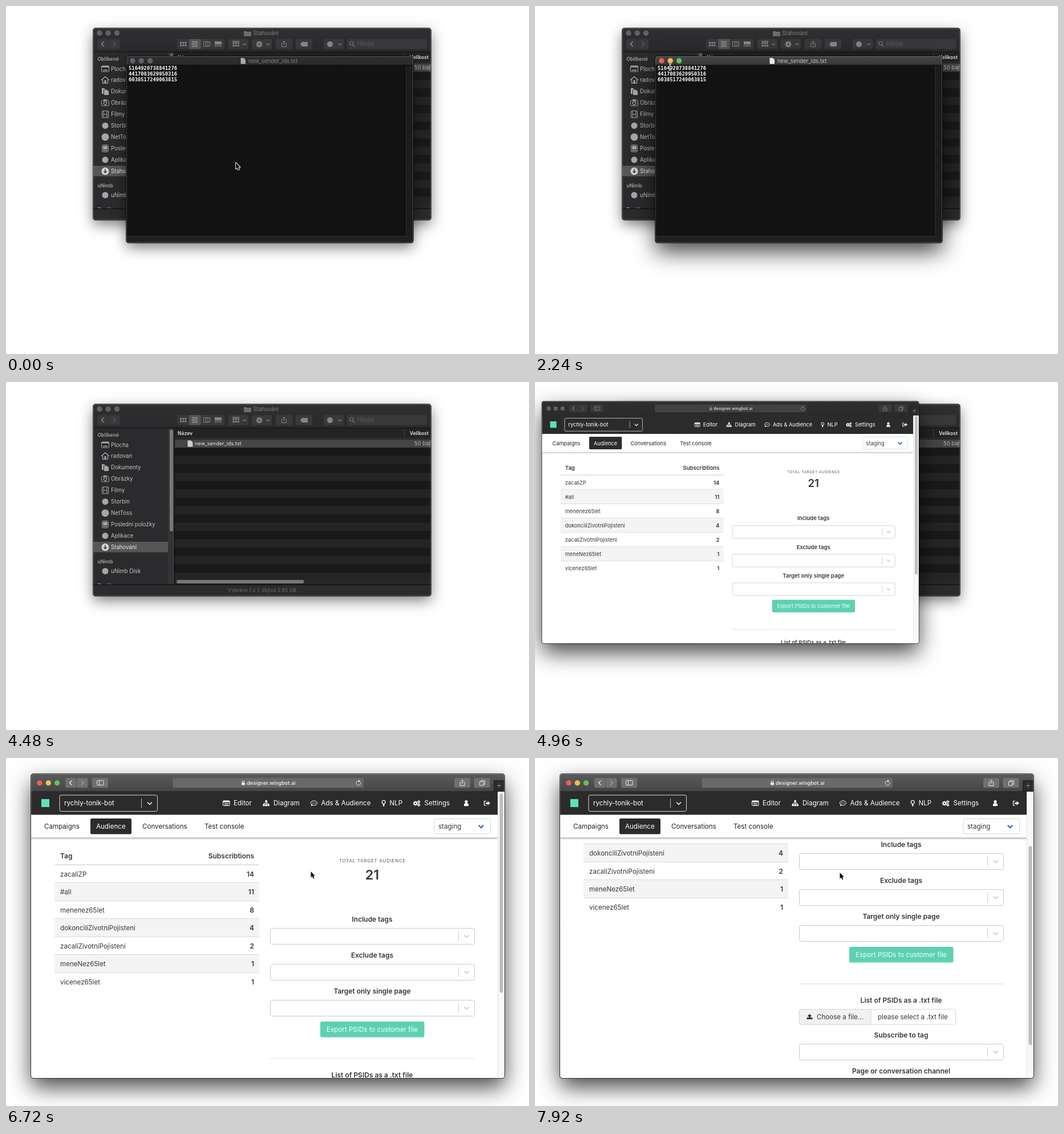
An HTML page with a canvas for the animation above (8 s loop, 917 px wide and 610 px high).

```html
<!DOCTYPE html>
<html lang="cs">
<head>
<meta charset="utf-8">
<title>Export workflow</title>
<style>
html, body { margin: 0; width: 100%; height: 100%; overflow: hidden; background: #fff; }
canvas { display: block; }
</style>
</head>
<body>
<canvas id="stage" width="917" height="610"></canvas>
<script>
const c = document.getElementById('stage').getContext('2d');
const LOOP = 8000, STEP = 80;
const SANS = 'Inter, Roboto, sans-serif', MONO = '"DejaVu Sans Mono", monospace';
const LIGHTS = ['#ee5c54', '#f5bd4f', '#5fc454'];
const DIM_BAR = ['#2f2f31', '#2a2a2c'], EDITOR_BAR = ['#454547', '#373739'], BROWSER_BAR = ['#5a5a5c', '#464648'];

// Drawing helpers
function box(x, y, w, h, fill, r = 0, stroke) {
  c.beginPath();
  c.roundRect(x, y, w, h, r);
  if (fill) { c.fillStyle = fill; c.fill(); }
  if (stroke) { c.strokeStyle = stroke; c.lineWidth = 1; c.stroke(); }
}
function dot(x, y, r, fill, stroke) {
  c.beginPath();
  c.arc(x, y, r, 0, 7);
  if (fill) { c.fillStyle = fill; c.fill(); }
  if (stroke) { c.strokeStyle = stroke; c.lineWidth = 1.2; c.stroke(); }
}
function line(color, width, ...p) {
  c.beginPath();
  for (let i = 0; i < p.length; i += 2) c.lineTo(p[i], p[i + 1]);
  c.strokeStyle = color;
  c.lineWidth = width;
  c.stroke();
}
function poly(fill, ...p) {
  c.beginPath();
  for (let i = 0; i < p.length; i += 2) c.lineTo(p[i], p[i + 1]);
  c.closePath();
  c.fillStyle = fill;
  c.fill();
}
function text(s, x, y, size, color, weight = 400, align = 'left', family = SANS) {
  c.font = `${weight} ${size}px ${family}`;
  c.textAlign = align;
  c.fillStyle = color;
  c.fillText(s, x, y);
}
function chevron(x, y, color, r = 4, w = 1.5) {
  line(color, w, x - r, y - r / 2, x, y + r / 2, x + r, y - r / 2);
}
function sideArrow(x, y, dir, color) {
  line(color, 1.3, x - 2 * dir, y - 4, x + 2 * dir, y, x - 2 * dir, y + 4);
}
function lights(x, y, active) {
  for (let i = 0; i < 3; i++) dot(x + 15.3 * i, y, 4.7, active ? LIGHTS[i] : '#626264');
}
function frame(x, y, w, h, raised, draw) {
  c.save();
  c.shadowColor = raised ? 'rgba(0,0,0,.72)' : 'rgba(0,0,0,.52)';
  c.shadowBlur = raised ? 38 : 24;
  c.shadowOffsetY = raised ? 16 : 8;
  box(x, y, w, h, '#222', 4);
  c.restore();
  c.save();
  c.beginPath();
  c.roundRect(x, y, w, h, 4);
  c.clip();
  draw();
  c.restore();
  box(x - .5, y - .5, w + 1, h + 1, null, 4.5, 'rgba(0,0,0,.7)');
  box(x + .5, y + .5, w - 1, h - 1, null, 4, 'rgba(255,255,255,.2)');
}
function bar(x, y, w, h, [top, bottom]) {
  const g = c.createLinearGradient(0, y, 0, y + h);
  g.addColorStop(0, top);
  g.addColorStop(1, bottom);
  box(x, y, w, h, g);
}
function page(x, y, w, h, color) {
  poly(color, x, y, x + w * .6, y, x + w, y + h * .3, x + w, y + h, x, y + h);
}
function shareIcon(x, y, color) {
  line(color, 1, x - 2, y - 1, x - 4, y - 1, x - 4, y + 5, x + 4, y + 5, x + 4, y - 1, x + 2, y - 1);
  line(color, 1, x, y + 2, x, y - 5);
  line(color, 1, x - 2, y - 3, x, y - 5, x + 2, y - 3);
}
function gear(x, y, r, color, hole) {
  for (let i = 0; i < 4; i++) {
    const a = i * Math.PI / 4, dx = Math.cos(a) * r, dy = Math.sin(a) * r;
    line(color, r * .4, x - dx, y - dy, x + dx, y + dy);
  }
  dot(x, y, r * .75, color);
  dot(x, y, r * .32, hole);
}

// File manager
const ICON = '#a6a6a6';
const sideItems = [
  ['Plocha', y => { box(167.5, y - 5, 13, 10, null, 1, ICON); box(168, y - 5, 12, 2.5, ICON); line(ICON, 1.5, 170, y + 2.5, 178, y + 2.5); }],
  ['radovan', y => { line(ICON, 1.4, 167, y, 174, y - 6, 181, y); line(ICON, 1.2, 169.5, y - 1, 169.5, y + 5.5, 178.5, y + 5.5, 178.5, y - 1); box(172.5, y, 3, 5, ICON); }],
  ['Dokumenty', y => { page(168, y - 6, 7, 10, ICON); page(171, y - 3.5, 10, 10, '#2b2b2d'); page(172, y - 3, 8, 9, ICON); }],
  ['Obrázky', y => { box(167.5, y - 4, 13, 9, null, 1.5, ICON); box(171, y - 6, 6, 2, ICON); dot(174, y + .5, 2.7, null, ICON); }],
  ['Filmy', y => { box(168.5, y - 6, 11, 12, null, 1, ICON); line(ICON, 1, 171, y - 6, 171, y + 6); line(ICON, 1, 177, y - 6, 177, y + 6); line(ICON, 1, 171, y, 177, y); }],
  ['Storbin', y => dot(174, y, 5.5, ICON)],
  ['NetToss', y => dot(174, y, 6.5, ICON)],
  ['Poslední položky', y => { box(168.5, y - 6, 11, 12, null, 2, ICON); box(170, y - 4.5, 8, 6, ICON); line(ICON, 1.5, 170, y + 3.5, 178, y + 3.5); }],
  ['Aplikace', y => dot(174, y, 5.5, ICON)],
  ['Stahování', y => { dot(174, y, 6.5, '#d4d4d4'); line('#444', 1.6, 174, y - 4, 174, y + 2); poly('#444', 170.5, y, 177.5, y, 174, y + 4); }]
];

function finderToolbar() {
  const fg = '#858585', bg = '#39393b';
  lights(164, 47.5, false);
  box(417, 44, 5, 3, '#6c6c6c', 1);
  box(417, 45, 13, 8, '#6c6c6c', 1);
  text('Stahování', 433, 51.4, 9.7, '#808080');
  const parts = [[160, 19], [180, 19], [300, 83], [390, 35], [431, 35], [473, 29], [508, 29], [557, 35]];
  for (const [x, w] of parts) box(x, 58, w, 17.5, bg, 2.5);
  box(321, 58, 20.5, 17.5, '#555557');
  sideArrow(169.5, 66.5, -1, '#999');
  sideArrow(189.5, 66.5, 1, '#5d5d5d');
  for (let i = 0; i < 6; i++) {
    const dx = i % 3 * 4.2, dy = i > 2 ? 4.5 : 0;
    box(305 + dx, 63 + dy, 3, 3, fg);
    box(397.5 + dx, 63.5 + dy, 3, 3, fg);
  }
  for (let i = 0; i < 4; i++) line('#aaa', 1, 326, 62.5 + 2.8 * i, 336, 62.5 + 2.8 * i);
  box(346.5, 62.5, 11, 8, null, 0, fg);
  line(fg, 1, 350.5, 62, 350.5, 71);
  line(fg, 1, 354, 62, 354, 71);
  box(366, 62, 12, 5.5, fg);
  for (let i = 0; i < 4; i++) box(366 + 3.2 * i, 69, 2.2, 2, fg);
  line(fg, 1.5, 397, 62, 409, 62);
  gear(444, 67, 5.5, fg, bg);
  shareIcon(487.5, 66.5, fg);
  poly(fg, 516, 67, 519, 63, 529, 63, 529, 71, 519, 71);
  dot(568, 67, 5, fg);
  for (const x of [418, 459.5, 585.5]) chevron(x, 67, fg, 2.4, 1.2);
  box(598, 58, 140, 17.5, '#39393b', 2.5);
  dot(606, 65.5, 3, null, '#777');
  line('#777', 1.2, 608, 68, 611, 71);
  text('Hledat', 616, 70.2, 9.7, '#59595b');
}

function finder() {
  frame(153, 39, 592, 336, false, () => {
    box(153, 39, 592, 336, '#2b2b2d');
    bar(153, 39, 592, 42, DIM_BAR);
    finderToolbar();
    line('#111', 1, 153, 80.5, 745, 80.5);
    // Sidebar
    box(153, 280, 131, 18.5, '#555756');
    text('Oblíbené', 160.5, 95.8, 8.6, '#a2a2a2', 600);
    sideItems.forEach(([name, icon], i) => {
      const y = 110 + 19.95 * i;
      icon(y);
      text(name, 184, y + 3.5, 9.7, i == 9 ? '#e6e6e6' : '#c2c2c2');
    });
    text('uNimb', 160.5, 317.6, 8.6, '#a2a2a2', 600);
    dot(174, 331.5, 5.5, ICON);
    text('uNimb Disk', 184, 335.2, 9.7, '#c2c2c2');
    text('Značky', 160.5, 359.5, 8.6, '#a2a2a2', 600);
    box(284, 81, 11, 274, '#343436');
    box(287, 83.5, 6, 178.5, '#777', 3);
    line('#0a0a0a', 1, 295.5, 81, 295.5, 355);
    // File list
    box(296, 81, 449, 274, '#191919');
    for (let i = 0; i < 17; i += 2) box(296, 100.5 + 14.6 * i, 449, 14.6, i ? '#242424' : '#454547');
    box(296, 81, 449, 17, '#232324');
    line('#3d3d3d', 1, 296, 98.5, 745, 98.5);
    line('#444', 1, 698.5, 83, 698.5, 97);
    text('Název', 301, 93.2, 8.6, '#e2e2e2', 600);
    text('Velikost', 708, 93.2, 8.6, '#e2e2e2', 600);
    page(318.5, 102.5, 9, 11, '#ccc');
    text('new_sender_ids.txt', 331, 111.2, 9, '#e8e8e8');
    text('50 bajtů', 716, 111.2, 9.5, '#b4b4b4');
    box(296, 344, 449, 11, '#272728');
    box(299, 347, 223.5, 6, '#777', 3);
    box(153, 355, 592, 20, '#2b2b2d');
    line('#0a0a0a', 1, 153, 355.5, 745, 355.5);
    text('Vybráno 1 z 1, zbývá 2,85 GB', 449, 367.6, 8.8, '#6d6d6d', 400, 'center');
  });
}

// Text editor
function editor(active) {
  frame(211, 88, 503, 327, active, () => {
    box(211, 88, 503, 327, '#121212');
    bar(211, 88, 503, 16, active ? EDITOR_BAR : DIM_BAR);
    line('#080808', 1, 211, 103.8, 714, 103.8);
    lights(222, 96, active);
    page(411.5, 91, 8.5, 10.5, active ? '#eee' : '#aaa');
    text('new_sender_ids.txt', 425, 99.6, 9.5, active ? '#c4c4c4' : '#808080');
    ['5164920738841276', '4417083629950316', '6038517249063815'].forEach((id, i) =>
      text(id, 215, 112.3 + 10 * i, 8.83, '#fff', 700, 'left', MONO));
    box(702, 104.5, 12, 311, '#1c1c1c');
    box(211, 404, 503, 11, '#202020');
    line('#303030', 1, 211, 403.5, 702, 403.5, 702, 104);
  });
}

// Browser
const tags = [['zacaliZP', 14], ['#all', 11], ['menenez65let', 8], ['dokonciliZivotniPojisteni', 4],
  ['zacaliZivotniPojisteni', 2], ['meneNez65let', 1], ['vicenez65let', 1]];
const INK = '#363636', DARK = '#2b2b2c';
const body = (s, x, y, color = INK, align) => text(s, x, y, 11.6, color, 400, align);
const strong = (s, x, y, align) => text(s, x, y, 12, INK, 600, align);

function select(y) {
  box(463.5, y + .5, 358, 28, '#fff', 3, '#c9c9c9');
  line('#ccc', 1, 793.5, y + 6, 793.5, y + 23);
  chevron(807.5, y + 14.5, '#c4c4c4');
}

function content() {
  strong('Tag', 95, 178.6);
  strong('Subscribtions', 435, 178.6, 'right');
  line('#d8d8d8', 1.6, 85, 190.2, 444, 190.2);
  tags.forEach(([name, n], i) => {
    const y = 191 + 31.45 * i;
    if (i % 2) box(85, y, 359, 31.4, '#f4f4f4');
    if (i) line('#d8d8d8', 1, 85, Math.round(y) - .5, 444, Math.round(y) - .5);
    body(name, 95, y + 19.8);
    strong(n, 435, y + 19.8, 'right');
  });
  c.letterSpacing = '.85px';
  text('TOTAL TARGET AUDIENCE', 642.5, 186.4, 7.8, '#555', 400, 'center');
  c.letterSpacing = '0px';
  text('21', 642, 216.4, 23.5, INK, 600, 'center');
  ['Include tags', 'Exclude tags', 'Target only single page'].forEach((s, i) => {
    strong(s, 642, 289.8 + 63 * i, 'center');
    select(301 + 63 * i);
  });
  box(551, 465, 182.5, 27.5, '#5dd1b1', 2.5);
  body('Export PSIDs to customer file', 642, 483, '#f4fffb', 'center');
  line('#dcdcdc', 1, 463, 530, 822, 530);
  strong('List of PSIDs as a .txt file', 642, 562.8, 'center');
  box(463.5, 574.5, 274, 26.5, '#fff', 3, '#d6d6d6');
  box(463.5, 574.5, 125.5, 26.5, '#f1f1f1', [3, 0, 0, 3], '#d6d6d6');
  poly(INK, 477.5, 587, 481.5, 582.5, 485.5, 587);
  box(480.3, 586, 2.6, 4, INK);
  box(476.5, 589, 10, 3, INK);
  body('Choose a file...', 494, 592);
  body('please select a .txt file', 601, 592);
  strong('Subscribe to tag', 642, 624, 'center');
  select(635);
  strong('Page or conversation channel', 642, 687, 'center');
}

function navIcons() {
  const w = '#fff';
  box(380.5, 75, 11.5, 8.5, null, 1, w);
  box(380.5, 75, 11.5, 2.5, w);
  for (const y of [79.5, 81.8]) line(w, 1, 382.5, y, 390, y);
  box(454.5, 74, 3.5, 3.5, w);
  for (const x of [450.5, 454.5, 458.5]) box(x, 81, 3.3, 3.3, w);
  line(w, 1, 452, 81, 452, 79.3, 460, 79.3, 460, 81);
  line(w, 1, 456.2, 77, 456.2, 81);
  c.beginPath();
  c.ellipse(540, 79, 5.5, 4, 0, 0, 7);
  c.strokeStyle = w;
  c.stroke();
  poly(w, 535.5, 81, 538.5, 82.5, 535, 84.5);
  for (const x of [537.5, 540, 542.5]) dot(x, 79, .8, w);
  dot(662.2, 77.3, 3, null, w);
  line(w, 2.4, 662.2, 80.5, 662.2, 84.5);
  gear(717.8, 79.5, 4, w, DARK);
  gear(723.7, 76.8, 2.6, w, DARK);
  gear(723.7, 82.3, 2.6, w, DARK);
  dot(807, 76.5, 2.6, w);
  box(803, 79.3, 8, 5, w, [3, 3, 1, 1]);
  line(w, 1.2, 842, 75.5, 838.5, 75.5, 838.5, 83, 842, 83);
  box(841, 78, 4, 2.6, w);
  poly(w, 844.5, 75.5, 849, 79.3, 844.5, 83);
}

function browserBar(active) {
  const btn = active ? '#707072' : '#3a3a3c', fg = active ? '#e8e8e8' : '#8a8a8a';
  bar(44, 28, 830, 30, active ? BROWSER_BAR : DIM_BAR);
  lights(59, 43.8, active);
  for (const [x, w] of [[104, 19], [124, 19.5], [151, 28], [786, 28], [820.5, 28]]) box(x, 35, w, 17, btn, 2.5);
  sideArrow(113.5, 43.5, -1, fg);
  sideArrow(134, 43.5, 1, active ? '#a2a2a2' : '#5c5c5c');
  box(159.5, 39.5, 11.5, 8, null, 1, fg);
  line(fg, 1, 163.5, 39.5, 163.5, 47.5);
  box(292.5, 35, 334.5, 17, active ? '#69696b' : '#414143', 2.5);
  box(413, 43, 6, 4.5, fg, .5);
  line(fg, 1, 414.3, 43, 414.3, 40.5, 417.7, 40.5, 417.7, 43);
  text('designer.wingbot.ai', 422, 47.2, 9.1, active ? '#f4f4f4' : '#e0e0e0', 500);
  c.beginPath();
  c.arc(618, 44, 3.8, -.4, 5.2);
  c.strokeStyle = fg;
  c.lineWidth = 1;
  c.stroke();
  poly(fg, 618, 38.2, 621.5, 40.5, 618, 42.5);
  shareIcon(800, 43.5, fg);
  box(830.5, 41.5, 6.5, 6.5, null, 0, fg);
  line(fg, 1, 833, 41.5, 833, 39.5, 839.5, 39.5, 839.5, 46, 837, 46);
  box(855.5, 39.5, 19, 19, '#2c2c2e', 0, '#1d1d1f');
  line('#888', 1, 860.5, 48.5, 868.5, 48.5);
  line('#888', 1, 864.5, 44.5, 864.5, 52.5);
}

function browser(active, scroll) {
  frame(44, 28, 830, 533, true, () => {
    box(44, 58, 830, 503, '#fff');
    c.save();
    c.beginPath();
    c.rect(44, 140, 818, 421);
    c.clip();
    c.translate(0, -scroll);
    content();
    c.restore();
    // Fixed page header
    c.save();
    c.shadowColor = 'rgba(0,0,0,.4)';
    c.shadowBlur = 3;
    c.shadowOffsetY = 1;
    box(44, 99, 818, 40.5, '#fff');
    c.restore();
    box(44, 58, 818, 41.5, DARK);
    box(62, 72, 14, 14, '#5fe0bd');
    box(94, 65, 171.5, 28.5, null, 3, '#d8d8d8');
    line('#bbb', 1, 237.5, 71, 237.5, 87);
    chevron(252, 79.5, '#fff');
    body('rychly-tonik-bot', 102, 83.4, '#fff');
    [['Editor', 399], ['Diagram', 469], ['Ads & Audience', 552.5], ['NLP', 672.5], ['Settings', 733.5]]
      .forEach(([s, x]) => body(s, x, 83.4, '#fff'));
    navIcons();
    box(148, 106, 72, 27.5, DARK, 2.5);
    body('Campaigns', 67, 124.2, '#222');
    body('Audience', 158, 124.2, '#fff');
    body('Conversations', 239, 124.2, '#222');
    body('Test console', 348, 124.2, '#222');
    box(751, 106.5, 98.5, 26.5, '#fff', 3, '#d6d6d6');
    body('staging', 758, 124.2);
    chevron(833, 120, '#2f6cc4', 4.2, 2.2);
    // Scrollbar
    box(862, 58, 12, 503, '#f8f8f8');
    line('#e4e4e4', 1, 862.5, 58, 862.5, 561);
    box(865.5, 60.5 + scroll * .7, 6, 349, '#bdbdbd', 3);
    browserBar(active);
  });
}

// Motion
const mix = (a, b, p) => a + (b - a) * p;
const part = (t, a, b) => Math.min(1, Math.max(0, (t - a) / (b - a)));
const smooth = p => p * p * (3 - 2 * p);
function along(keys, t, ease = p => p) {
  const i = Math.max(1, keys.findIndex(k => k[0] > t));
  if (t >= keys.at(-1)[0]) return keys.at(-1).slice(1);
  const a = keys[i - 1], b = keys[i], p = ease(part(t, a[0], b[0]));
  return a.slice(1).map((v, j) => mix(v, b[j + 1], p));
}
const scrollKeys = [[6640, 0], [6720, 3], [7040, 16], [7360, 45], [7640, 94], [7920, 134]];
const pointerKeys = [[0, 403, 275], [1200, 403, 275], [2240, 237, 107], [2480, 222, 95], [2880, 220, 94.5],
  [3280, 220, 94.5], [4080, 18.5, 72], [5200, -6, 82], [6080, 534.5, 199], [7600, 534.5, 199], [7920, 534.5, 201]];

function pointer(t) {
  if (t >= 4160 && t < 5200) return;
  const [x, y] = along(pointerKeys, t, smooth);
  if (t >= 80 && t < 2320) {
    for (const [color, w] of [['#222', 2.6], ['#fff', 1.2]]) {
      line(color, w, x, y - 5, x, y + 5);
      line(color, w, x - 2.5, y - 6, x, y - 5, x + 2.5, y - 6);
      line(color, w, x - 2.5, y + 6, x, y + 5, x + 2.5, y + 6);
    }
    return;
  }
  c.save();
  c.translate(x, y);
  c.beginPath();
  for (const [px, py] of [[0, 0], [0, 10.5], [2.4, 8.4], [4.1, 12.2], [5.9, 11.4], [4.3, 7.8], [7.4, 7.5]]) c.lineTo(px, py);
  c.closePath();
  c.lineJoin = 'round';
  c.strokeStyle = '#fff';
  c.lineWidth = 1.8;
  c.stroke();
  c.fillStyle = '#111';
  c.fill();
  c.restore();
}

// The editor shrinks into its icon in the file list.
function closing(t) {
  const p = smooth(part(t, 2960, 3200)), q = part(t, 3200, 3360);
  const [x, y, w, h] = [[211, 323, 318.5], [88, 105, 102.5], [503, 28, 9], [327, 37, 11]]
    .map(([a, b, d]) => mix(mix(a, b, p), d, q));
  c.save();
  if (p < 1) {
    c.globalAlpha = 1 - p;
    c.save();
    c.translate(x, y);
    c.scale(w / 503, h / 327);
    c.translate(-211, -88);
    editor(true);
    c.restore();
  }
  c.globalAlpha = p * (1 - q) * .95;
  page(x, y, w, h, '#d0d0d0');
  poly('#efefef', x + w * .6, y, x + w, y + h * .3, x + w * .6, y + h * .3);
  for (let i = 0; i < 3; i++) line('#aaa', 1, x + w * .15, y + h * (.48 + .09 * i), x + w * .85, y + h * (.48 + .09 * i));
  c.restore();
}

function draw(t) {
  c.fillStyle = '#fff';
  c.fillRect(0, 0, 917, 610);
  if (t < 5200) finder();
  if (t < 2960) editor(t >= 80);
  else if (t < 3360) closing(t);
  if (t >= 4960) {
    // The window grows out of a point beyond the left edge.
    const s = 1 - .204 * (1 - part(t, 4960, 5200)) ** 2;
    c.save();
    c.translate(-112 * (1 - s), 57.5 * (1 - s));
    c.scale(s, s);
    browser(t >= 5200, along(scrollKeys, t)[0]);
    c.restore();
  }
  pointer(t);
}

const start = performance.now();
function tick() {
  const t = (performance.now() - start) % LOOP;
  draw(Math.floor(t / STEP) * STEP);
  requestAnimationFrame(tick);
}
tick();
</script>
</body>
</html>
```
